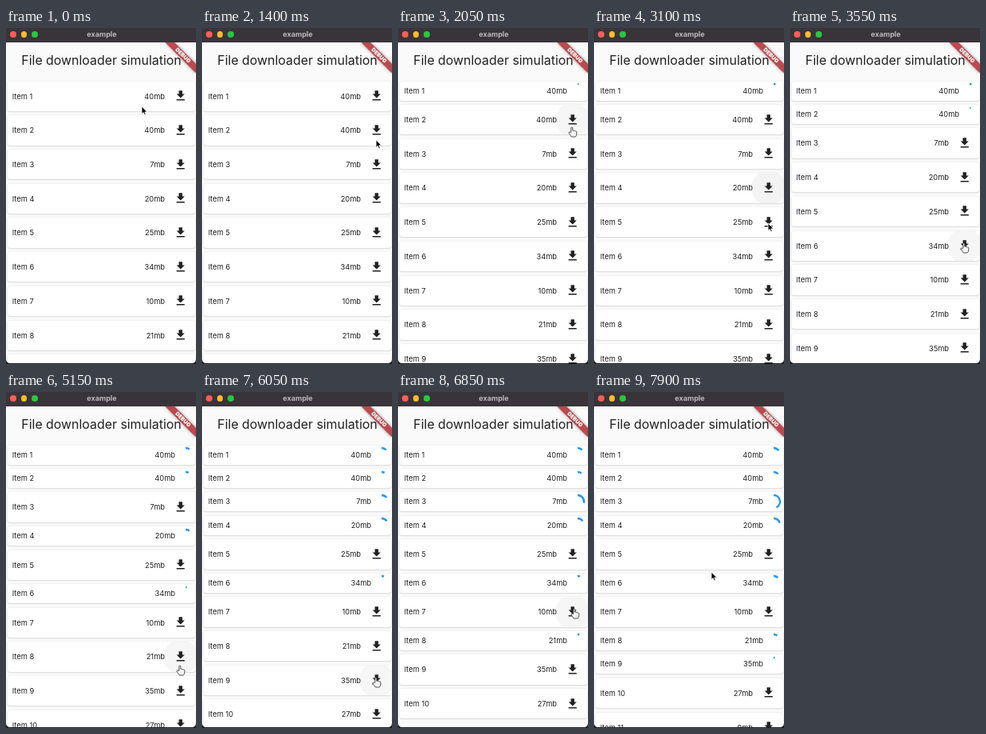
An HTML page that plays this animation: 238x420 px, repeating every 8000 ms.

```html
<!DOCTYPE html>
<html lang="en">
<head>
<meta charset="utf-8">
<title>File downloader simulation</title>
<style>
html, body { margin: 0; width: 100%; height: 100%; overflow: hidden; background: #1d1b1d; }
body { font-family: Inter, "Open Sans", sans-serif; color: #212121; }
div, span, svg { position: absolute; white-space: nowrap; }
svg { overflow: visible; }
#app { width: 238px; height: 419px; overflow: hidden; background: #fafafa; border-radius: 0 0 5px 5px; }
#bar { width: 240px; height: 18px; background: #39343a; color: #bcb8bc;
  font: 700 9px/16.5px Inter, sans-serif; text-align: center; }
#bar i { position: absolute; top: 4.2px; width: 7.8px; height: 7.8px; border-radius: 50%; }
#title { top: 29.4px; width: 239px; font-size: 15.9px; line-height: 24px; text-align: center; }
#corner { top: 18px; width: 238px; height: 60px; overflow: hidden; }
#debug { left: 211.4px; top: 18.6px; width: 53.2px; height: 8px; transform-origin: 26.6px -18.6px;
  transform: rotate(45deg); background: #bb4a4e; box-shadow: 0 0 4px #0007; color: #fff;
  font: 900 6.8px/8px Inter, sans-serif; text-align: center; }
.row { left: 2px; width: 235px; background: #fff; border-radius: 2.7px; font-size: 9.3px;
  box-shadow: 0 .6px 1.7px #00000036; }
.clip { inset: 0; overflow: hidden; border-radius: 2.7px; }
.glow { left: 195px; top: 50%; width: 44px; height: 44px; margin-top: -22px; border-radius: 50%; background: #000; }
.name { left: 5.7px; }
.icon { left: 208.3px; top: 50%; width: 17.4px; height: 17.4px; margin-top: -9px; fill: #212121; }
.arc { left: 223.4px; top: 50%; width: 1px; height: 1px; margin-top: -.5px; fill: none;
  stroke: #2196f3; stroke-width: 2.4; }
#cursor { left: 0; top: 0; width: 1px; height: 1px; stroke-width: .9; stroke-linejoin: round; }
</style>
</head>
<body>
<div id="app">
  <div id="title">File downloader simulation</div>
  <div id="list"></div>
  <div id="corner"><div id="debug">DEBUG</div></div>
  <div id="bar">
    <i style="left:4.8px;background:#ff5f57"></i>
    <i style="left:18.5px;background:#febc2e"></i>
    <i style="left:32.2px;background:#28c840"></i>
    example
  </div>
  <svg id="cursor"><path/></svg>
</div>
<script>
const LOOP = 8000, TRAVEL = 350, FADE = 100;
const TOP = 66.6, GAP = 5.3, TALL = 37.4, SHORT = 24.1, RADIUS = 8;
const ARROW = 'M0 0V9.6L2.2 7.6 3.7 11 5.3 10.3 3.9 7H6.9Z';
const HAND = 'M-1.2 6.3V1a1 1 0 0 1 2 0V4.2q1.6-.6 1.8.4 1.5-.4 1.7.5 1.5-.2 1.5 1V8q0 2.5-1.5 4H-.8Q-2.5 9.5-4 7.4q-.5-1.4 1-1.2Z';
const sizes = [40, 40, 7, 20, 25, 34, 10, 21, 35, 27, 9];

// where the cursor rests, when it leaves, and the item it clicks there
const stops = [
  { x: 170, y: 98, leave: 50 },
  { x: 190, y: 99, leave: 250 },
  { x: 218, y: 82, leave: 1000, item: 1 },
  { x: 218, y: 150, leave: 1360 },
  { x: 218, y: 124, leave: 2200, item: 2 },
  { x: 218, y: 197, leave: 3020, item: 4 },
  { x: 218, y: 269, leave: 3950, item: 6 },
  { x: 219, y: 142, leave: 4700, item: 3 },
  { x: 218, y: 342, leave: 5500, item: 8 },
  { x: 218, y: 357, leave: 6350, item: 9 },
  { x: 221, y: 271, leave: 7300, item: 7 },
  { x: 147, y: 225, leave: LOOP }
];
stops.forEach((s, i) => {
  s.depart = i ? stops[i - 1].leave : -TRAVEL;
  s.hover = s.depart + TRAVEL - FADE;
  s.click = s.leave - 50;
});

const ramp = (t, from, span) => Math.min(1, Math.max(0, (t - from) / span));
const mix = (a, b, k) => a + (b - a) * k;
const cursor = document.getElementById('cursor');
const pointer = cursor.firstElementChild;

const rows = sizes.map((mb, i) => {
  const el = document.createElement('div');
  el.className = 'row';
  el.innerHTML = `<div class="clip"><div class="glow"></div></div>
    <span class="name">Item ${i + 1}</span><span class="size">${mb}mb</span>
    <svg class="icon" viewBox="0 0 24 24"><path d="M19 9h-4V3H9v6H5l7 7 7-7zM5 18v2h14v-2H5z"/></svg>
    <svg class="arc"><path/></svg>`;
  document.getElementById('list').append(el);
  const find = s => el.querySelector(s);
  return { el, mb, visit: stops.find(s => s.item === i + 1), glow: find('.glow'),
    size: find('.size'), icon: find('.icon'), arc: find('.arc path') };
});

function glowAt(t, { hover, click, leave }) {
  const over = ramp(t, hover, FADE) * (1 - ramp(t, leave, 2 * FADE));
  const splash = ramp(t, click, FADE) * (1 - ramp(t, click + FADE, 2 * FADE));
  return .035 * over + .03 * splash;
}

function arcPath(part) {
  const a = part * 2 * Math.PI;
  return `M0 ${-RADIUS}A${RADIUS} ${RADIUS} 0 ${+(part > .5)} 1 ${RADIUS * Math.sin(a)} ${-RADIUS * Math.cos(a)}`;
}

function drawRows(t) {
  let y = TOP;
  for (const { el, mb, visit, glow, size, icon, arc } of rows) {
    // one megabyte per second, the first arriving a second after the click
    const loaded = visit ? Math.max(0, Math.floor((t - visit.click) / 1000)) : 0;
    const height = loaded ? SHORT : TALL;
    Object.assign(el.style, { top: y + 'px', height: height + 'px', lineHeight: height + 'px' });
    size.style.right = (loaded ? 25 : 38) + 'px';
    icon.style.display = loaded ? 'none' : '';
    arc.setAttribute('d', loaded ? arcPath(loaded / mb) : '');
    glow.style.opacity = visit && !loaded ? glowAt(t, visit) : 0;
    y += height + GAP;
  }
}

function drawCursor(t) {
  const i = stops.findIndex(s => s.leave > t);
  const to = stops[i], from = stops[i - 1] || to;
  const k = 1 - (1 - ramp(t, to.depart, TRAVEL)) ** 4;
  const hand = to.item && t >= to.hover;
  cursor.style.transform = `translate(${mix(from.x, to.x, k)}px, ${mix(from.y, to.y, k)}px)`;
  pointer.setAttribute('d', hand ? HAND : ARROW);
  pointer.setAttribute('fill', hand ? '#f4f4f4' : '#000');
  pointer.setAttribute('stroke', hand ? '#444' : '#fff');
}

const start = performance.now();
function frame() {
  const t = (performance.now() - start) % LOOP;
  drawRows(t);
  drawCursor(t);
  requestAnimationFrame(frame);
}
frame();
</script>
</body>
</html>
```
